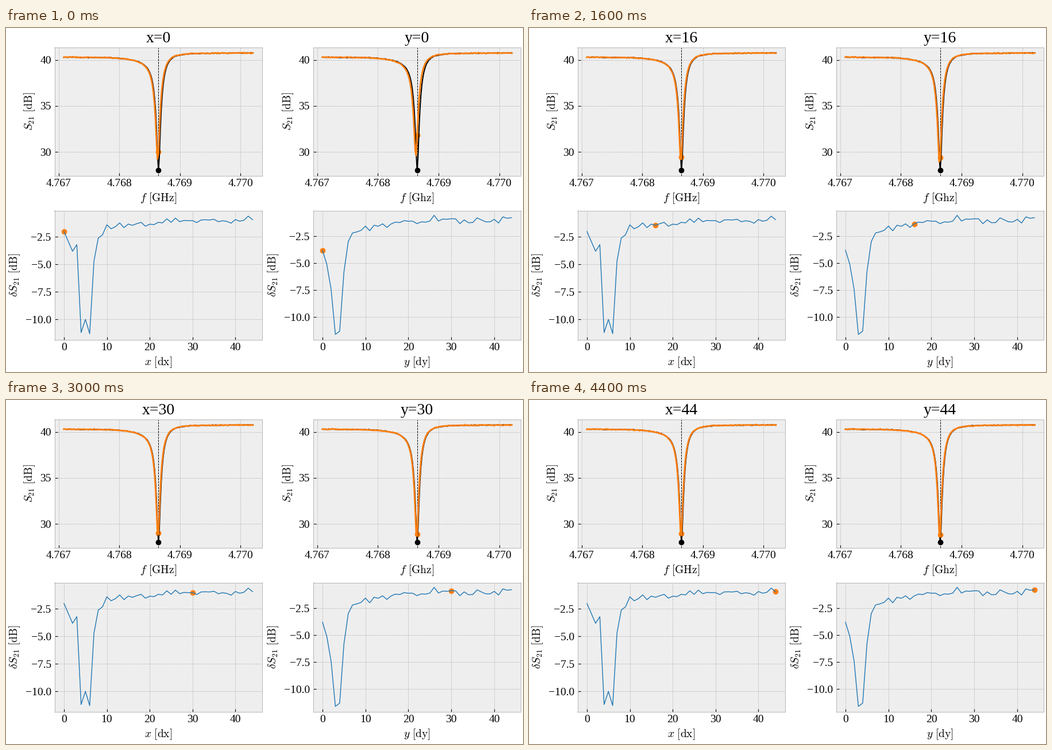
These frames come from a looping animation (900x600 px, 4500 ms). A matplotlib script:

```python
import numpy as np
import matplotlib.pyplot as plt
from matplotlib.animation import FuncAnimation

W, H, DPI = 900, 600, 100
ORANGE, BLUE = "#ff7f0e", "#1f77b4"
STEPS = 45
F0, FLOOR, SHOULDER = 4.768647, 28.03, 39.2
WIDTH = 8.05e-5

plt.rcParams.update({
    "font.family": "Liberation Serif", "font.size": 14, "mathtext.fontset": "cm",
    "axes.facecolor": "#eeeeee", "axes.edgecolor": "#bcbcbc",
    "axes.grid": True, "axes.axisbelow": True,
    "axes.titlesize": 20, "axes.labelsize": 14,
    "grid.color": "#b2b2b2", "grid.linestyle": "--", "grid.linewidth": 0.5,
    "xtick.direction": "in", "ytick.direction": "in", "ytick.major.pad": 4.2,
})

freq = np.sort(np.append(np.linspace(4.767085, 4.770205, 201), F0))


def depth_curve(dip, seed):
    """Change of S21 per step: a measured dip, then a noisy recovery."""
    n = np.arange(STEPS)
    noise = np.random.default_rng(seed).normal(0, 0.16, STEPS)
    curve = -0.95 - 0.8 * np.exp(-(n - 10) / 8) + noise
    curve[:len(dip)] = dip
    return curve


def notch(u, low):
    """Resonance dip in dB over the scaled detuning u, with its minimum at low."""
    eps = 10 ** ((low - SHOULDER) / 10)
    tail = np.exp(-np.abs(u) / np.where(u < 0, 3, 1))
    plateau = np.where(u < 0, 40.3, 40.75)
    base = plateau + (SHOULDER - plateau) * tail
    return base + 10 * np.log10((u**2 + eps) / (1 + u**2))


def trace(shift, low, seed):
    u = (freq - F0) / WIDTH + shift
    noise = np.random.default_rng(seed).normal(0, 0.025, freq.size)
    return notch(u, low) + noise * np.clip(np.abs(u) / 4, 0, 1)


def shifted_trace(delta, gain, seed):
    """Trace whose value at F0 lies -delta above the reference floor."""
    low = FLOOR + min(-gain * delta, 1.6)
    u = np.linspace(0, 5, 2000)
    return trace(np.interp(FLOOR - delta, notch(u, low), u), low, seed)


def add_axes(left, top, right, bottom, xlim, ylim, xlabel, ylabel):
    ax = fig.add_axes([left / W, 1 - bottom / H, (right - left) / W, (bottom - top) / H])
    ax.set(xlim=xlim, ylim=ylim, xlabel=xlabel)
    ax.set_ylabel(ylabel, labelpad=4.6)
    return ax


class Column:
    def __init__(self, name, left, right, unit, dip, ylim, gain, seed):
        self.name, self.gain, self.seed = name, gain, seed
        self.deltas = depth_curve(dip, seed)

        top = add_axes(left, 33.5, right, 257.8, (4.766932, 4.770354), (27.43, 41.37),
                       rf"$f\ \mathrm{{[{unit}]}}$", r"$S_{21}\ \mathrm{[dB]}$")
        ticks = [4.767, 4.768, 4.769, 4.770]
        top.set_xticks(ticks, [f"{t:.3f}" for t in ticks])
        top.set_yticks([30, 35, 40])
        top.axvline(F0, color="k", ls="--", lw=0.7)
        top.plot(freq, trace(0, FLOOR, 7), color="k", lw=1.5)
        self.line, = top.plot(freq, freq, color=ORANGE, lw=2)
        top.scatter([F0], [FLOOR], color="k", s=36, lw=1, zorder=3)
        self.dot = top.scatter([F0], [FLOOR], color=ORANGE, s=36, lw=1)
        self.title = top.set_title("")

        low = add_axes(left, 318.5, right, 544.2, (-2.2, 46.2), ylim,
                       rf"${name}\ \mathrm{{[d{name}]}}$", r"$\delta S_{21}\ \mathrm{[dB]}$")
        low.set_yticks([-10, -7.5, -5, -2.5])
        low.plot(self.deltas, color=BLUE, lw=1)
        self.pos = low.scatter([0], [0], color=ORANGE, s=36, lw=1)

    def update(self, i):
        delta = self.deltas[i]
        self.title.set_text(f"{self.name}={i}")
        self.line.set_ydata(shifted_trace(delta, self.gain, self.seed + i))
        self.dot.set_offsets([[F0, FLOOR - delta]])
        self.pos.set_offsets([[i, delta]])


fig = plt.figure(figsize=(W / DPI, H / DPI), dpi=DPI, facecolor="white")
columns = [
    Column("x", 84.5, 445.6, "GHz",
           [-2, -2.9, -3.8, -3.2, -11.2, -10, -11.3, -4.7, -2.6, -2.3],
           (-11.88, -0.10), 0.5, 100),
    Column("y", 534.5, 896.3, "Ghz",
           [-3.8, -5.1, -7.4, -11.6, -11.3, -5.8, -3, -2.2],
           (-12.12, -0.13), 0.38, 200),
]


def update(i):
    for col in columns:
        col.update(i)


anim = FuncAnimation(fig, update, frames=STEPS, interval=100, repeat=True, repeat_delay=0)
plt.show()
```
